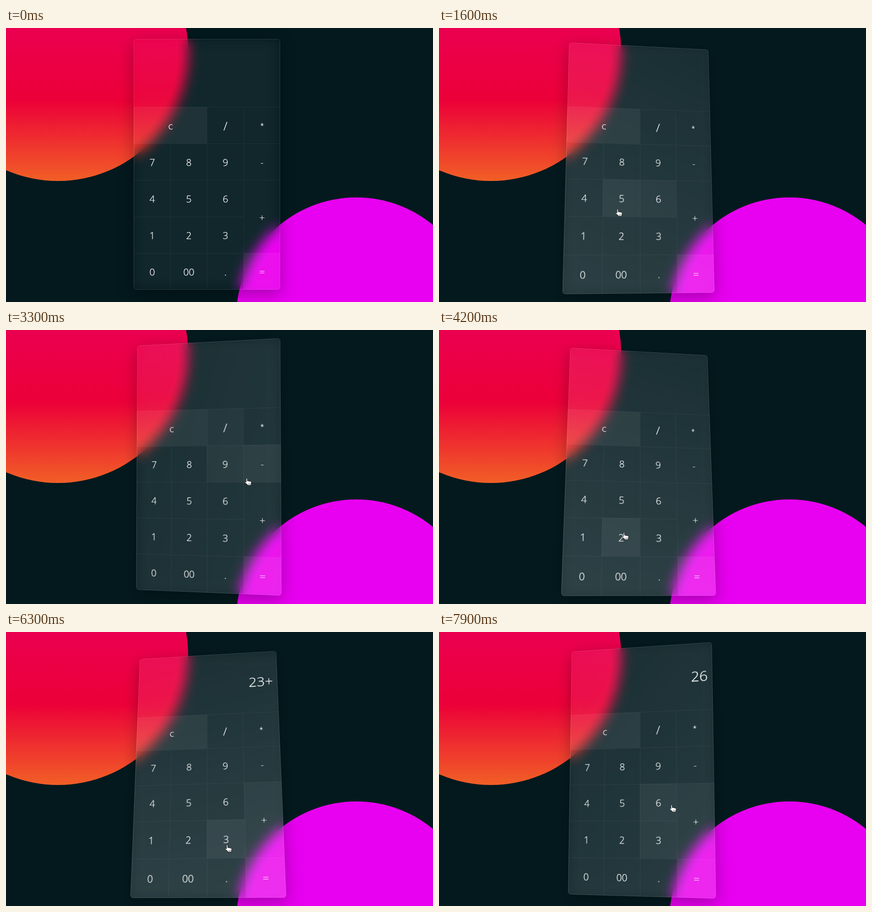
An HTML page for the animation above (8 s loop, 933x600 px).

```html
<!DOCTYPE html>
<html lang="en">
<head>
<meta charset="utf-8">
<title>Glass calculator</title>
<style>
  html, body { margin: 0; width: 100%; height: 100%; overflow: hidden; background: #03191e; }
  .stage { position: relative; width: 933px; height: 600px; overflow: hidden; background: #03191e; }
  .ball { position: absolute; border-radius: 50%; }
  .red {
    left: -171.5px; top: -234.5px; width: 569px; height: 569px;
    background: linear-gradient(#e80074, #ec0038 69%, #f15f26);
  }
  .magenta { left: 503px; top: 370.5px; width: 525px; height: 525px; background: #e800f0; }
  .panel {
    position: absolute; left: 279px; top: 24px; width: 320px; height: 549px;
    border-radius: 6px; overflow: hidden;
    /* lifts the dark ground but leaves the vivid balls as they are */
    backdrop-filter: blur(14px) contrast(.84) saturate(1.3) brightness(.92);
    box-shadow: 0 10px 35px rgba(0, 0, 0, .28);
    font: 300 21px "Open Sans", "Noto Sans", sans-serif; color: #fff;
    -webkit-text-stroke: .3px #fff;
  }
  .panel::after {
    content: ""; position: absolute; inset: 0; border-radius: 6px;
    border: 1px solid rgba(255, 255, 255, .13);
  }
  .keys {
    position: absolute; inset: 0; display: grid;
    grid-template: 149px repeat(5, 80px) / repeat(4, 80px);
  }
  .value {
    grid-column: span 4; padding-right: 10px;
    font-size: 32px; line-height: 148px; text-align: right;
  }
  .key {
    display: flex; align-items: center; justify-content: center; box-sizing: border-box;
    border: 0 solid rgba(255, 255, 255, .055); border-width: 1px 0 0 1px;
  }
  .wide { grid-column: span 2; }
  .tall { grid-row: span 2; }
  .star { font-size: 14px; }
  .slash { font-size: 25px; }
  .glare {
    position: absolute; left: 50%; top: 50%; width: 1098px; height: 1098px;
    transform-origin: 0 0; opacity: 0;
    background: linear-gradient(0deg, rgba(255, 255, 255, 0), #fff);
  }
  .hand { position: absolute; left: 0; top: 0; width: 17px; height: 18px; }
</style>
</head>
<body>
<div class="stage">
  <div class="ball red"></div>
  <div class="ball magenta"></div>
  <div class="panel">
    <div class="keys"><div class="value"></div></div>
    <div class="glare"></div>
  </div>
  <svg class="hand" viewBox="0 0 16 17">
    <path d="M3.6 1.8C3.6.2 6 .2 6 1.8V6l6.2 1.2c1.5.3 2.2 1.1 2.1 2.4l-.6 3.3v2.2H6.2v-1.5L1.4 9.7C.5 8.5 2 7.3 3.1 8.3l.7.6z"
      fill="#fff" stroke="#111" stroke-width=".8"/>
    <path d="M8.3 11v3M10.2 11v3M12 11v3" stroke="#333" stroke-width=".6"/>
  </svg>
</div>
<script>
const LOOP = 8000, STEP = 100, ENTER = 500, FADE = 500, MAX_TILT = 25, LIT = .055;
const BOX = { x: 279, y: 24, w: 320, h: 549 };
const $ = s => document.querySelector(s);
const panel = $('.panel'), glare = $('.glare'), hand = $('.hand'), value = $('.value');

const looks = { c: 'wide', '+': 'tall', '*': 'star', '/': 'slash' };
const keys = 'c / * 7 8 9 - 4 5 6 + 1 2 3 0 00 . ='.split(' ').map(label => {
  const el = document.createElement('div');
  el.className = 'key ' + (looks[label] || '');
  el.textContent = label;
  $('.keys').append(el);
  return { el, lit: label === 'c' || label === '=' };
});

// tilt that faces the pointer
const aim = (x, y) => [
  MAX_TILT * (2 * (y - BOX.y) / BOX.h - 1),
  MAX_TILT * (1 - 2 * (x - BOX.x) / BOX.w)
];

// pointer rests: arrive, leave, x, y, settled tilt
const stops = [
  [0, 450, 228, 340, [0, 0]],
  [1300, 1300, 474, 382],
  [1600, 1600, 390, 397, [10.1, 7.1]],
  [2600, 2700, 404, 206, [-10.3, 10.6]],
  [3900, 4200, 404, 444, [13.9, 6.7]],
  [4600, 4700, 470, 450],
  [5000, 5600, 584, 398, [9.7, -23]],
  [6500, 6700, 462, 465],
  [7100, 7700, 562, 515, [21, -21.8]],
  [7800, 7800, 513, 436],
  [7900, LOOP, 508, 379, [6.2, -10.9]]
].map(([arrive, leave, x, y, tilt]) => {
  const base = aim(x, y);
  return { arrive, leave, x, y, off: (tilt || base).map((v, i) => v - base[i]) };
});

const presses = [[4300, '2'], [4700, '3'], [5300, '+'], [6600, '3'], [7500, '=']];

function shown(t) {
  const text = presses.filter(([at]) => at <= t).map(([, key]) => key).join('');
  return text.endsWith('=')
    ? text.slice(0, -1).split('+').reduce((sum, n) => sum + Number(n), 0)
    : text;
}

// eased travel between rests; longer trips swing out sideways
function at(t) {
  const i = stops.findLastIndex(s => s.arrive <= t);
  const p = stops[i], q = stops[i + 1] || p;
  const time = q.arrive - p.leave;
  const u = time > 0 ? Math.max(0, t - p.leave) / time : 0;
  const s = u * u * (3 - 2 * u);
  const bow = Math.sin(Math.PI * s) * (time / 1500) ** 3;
  const dx = q.x - p.x, dy = q.y - p.y;
  const x = p.x + dx * s + dy * bow, y = p.y + dy * s - dx * bow;
  const tilt = aim(x, y).map((v, k) => v + p.off[k] + (q.off[k] - p.off[k]) * s);
  return { x, y, tilt };
}

function over({ el }, { x, y }) {
  const left = x - BOX.x - el.offsetLeft, top = y - BOX.y - el.offsetTop;
  return left >= 0 && left < el.offsetWidth && top >= 0 && top < el.offsetHeight;
}

function draw(t) {
  const { x, y, tilt: [a, b] } = at(t);
  panel.style.transform = `perspective(1090px) rotateX(${a}deg) rotateY(${b}deg)`;

  const angle = Math.atan2(-b * BOX.w, -a * BOX.h);
  const on = Math.min(1, Math.max(0, (t - ENTER + STEP) / 300));
  glare.style.transform = `rotate(${angle}rad) translate(-50%, -50%)`;
  glare.style.opacity = on * .1 * (1 + a / MAX_TILT);

  hand.style.visibility = t < ENTER ? 'hidden' : 'visible';
  hand.style.transform = `translate(${x - 5}px, ${y - 1}px)`;
  value.textContent = shown(t);

  // a key lights at once and fades after the pointer leaves
  const trail = [];
  for (let age = 0; age < FADE && t - age >= ENTER; age += 20) trail.push(at(t - age));
  for (const k of keys) {
    const last = trail.findIndex(p => over(k, p));
    const level = k.lit ? 1 : last < 0 ? 0 : 1 - last * 20 / FADE;
    k.el.style.background = `rgba(255, 255, 255, ${LIT * level})`;
  }
}

const start = performance.now();
function frame() {
  const t = (performance.now() - start) % LOOP;
  draw(Math.floor(t / STEP) * STEP);
  requestAnimationFrame(frame);
}
frame();
</script>
</body>
</html>
```
